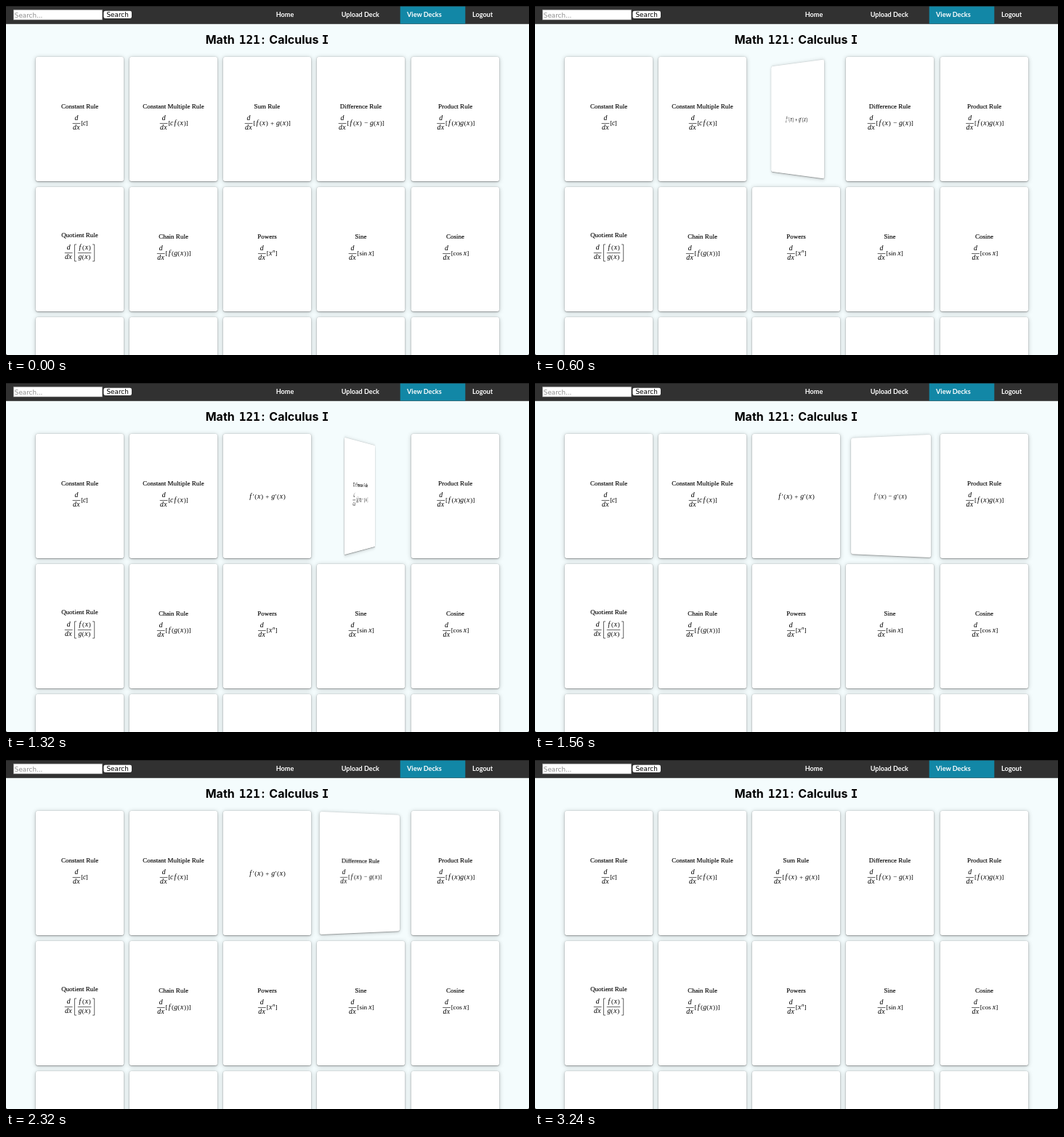
These frames come from a looping animation (720 px wide and 480 px high, 4.84 s). An HTML page:

```html
<!DOCTYPE html>
<html lang="en">
<head>
<meta charset="utf-8">
<title>Calculus flash cards</title>
<style>
html, body { margin: 0; width: 100%; height: 100%; overflow: hidden; background: #222; }
#stage { position: relative; width: 720px; height: 480px; overflow: hidden; background: #f4fcfd; border-radius: 0 0 2px 2px; }
#head { position: absolute; left: 0; top: 0; }
.card {
  position: absolute; width: 121px; height: 171px;
  background: #fff; border-radius: 2.5px;
  box-shadow: 0 .4px 1.4px rgba(0,0,0,.5), 0 1px 6px rgba(0,0,0,.24);
}
.card svg { position: absolute; left: 0; top: 0; overflow: visible; }
.card text { font: 9px "Liberation Serif", serif; fill: #000; text-anchor: middle; }
.card text.name { stroke: #000; stroke-width: .14; }
.card text.m { font-size: 9.2px; }
.card text.i { font-size: 9.8px; font-style: italic; }
.card text.sup { font-size: 7px; font-style: italic; }
.card path { fill: none; stroke: #222; stroke-width: .7; }
.nav { font: 700 9.1px Lato, "Open Sans", sans-serif; fill: #fff; }
.ui { font: 8.8px "DejaVu Sans", sans-serif; }
.title { font: 700 16px Inter, sans-serif; }
.slab { font: 700 16px "DejaVu Sans Mono", monospace; }
</style>
</head>
<body>
<div id="stage">
  <svg id="head" width="720" height="66">
    <rect width="720" height="24.8" fill="#313131"/>
    <rect width="720" height="1" fill="#222"/>
    <rect x="542.7" y=".6" width="89.6" height="23.9" fill="#1287a6"/>
    <rect x="10.3" y="5.2" width="122.4" height="13.8" fill="#fff" stroke="#888" stroke-width=".6"/>
    <rect x="134.5" y="6.7" width="38.5" height="10.4" rx="2.4" fill="#fff"/>
    <text class="ui" x="11.8" y="15.5" fill="#8d8d8d">Search...</text>
    <text class="ui" x="138.5" y="15.3">Search</text>
    <g class="nav">
      <text x="371.7" y="15.3">Home</text>
      <text x="461.7" y="15.3">Upload Deck</text>
      <text x="552" y="15.3">View Decks</text>
      <text x="642" y="15.3">Logout</text>
    </g>
    <g class="title">
      <text x="274.7" y="52">Math</text>
      <text class="slab" x="320.8" y="52">121</text>
      <text x="351.3" y="52">:</text>
      <text x="362.3" y="52">Calculus</text>
      <text class="slab" x="434.8" y="52">I</text>
    </g>
  </svg>
</div>
<script>
const EM = 9.1, W = 121, H = 171, DEPTH = 640, LOOP = 4840, STEP = 40;
const stage = document.getElementById('stage');

// Glyph advances in em
const ADV = {
  '[': .278, ']': .278, '(': .389, ')': .389, '+': 1.222, '−': 1.222, '′': .3, ' ': .167,
  f: .598, g: .513, x: .572, c: .433, d: .52, sin: 1.229, cos: 1.339, '^n': .45
};
const tokens = s => s.match(/sin|cos|\^n|./g);
const width = s => EM * tokens(s).reduce((sum, k) => sum + ADV[k], 0);
const label = (s, x, y, cls) => `<text class="${cls}" x="${x}" y="${y}">${s}</text>`;

function math(s, x, y) {
  return tokens(s).map(k => {
    const w = ADV[k] * EM, cx = x + w / 2;
    x += w;
    if (k === ' ') return '';
    if (k === '^n') return label('n', cx, y - 3.6, 'sup');
    return label(k, cx, y, /^[fgxcd]$/.test(k) ? 'i' : 'm');
  }).join('');
}

const centred = (s, cx, y) => math(s, cx - width(s) / 2, y);

function frac(num, den, cx, axis) {
  const w = Math.max(width(num), width(den)) / 2 + .4;
  return centred(num, cx, axis - 4.2) + centred(den, cx, axis + 8.6) +
    `<path d="M${cx - w} ${axis}H${cx + w}"/>`;
}

const PAD = .18 * EM, DX = width('dx') + 2 * PAD;

function derivative(name, body) {
  const x = W / 2 - (DX + width(body)) / 2;
  return label(name, W / 2, 70.8, 'name') + frac('d', 'dx', x + DX / 2, 91.5) + math(body, x + DX, 93.8);
}

function quotient() {
  const inner = width('f(x)') + 2 * PAD, b = .53 * EM;
  const x = W / 2 - (DX + inner + 2 * b) / 2, l = x + DX + 1.7, r = x + DX + 2 * b + inner - 1.7;
  return label('Quotient Rule', W / 2, 69.2, 'name') + frac('d', 'dx', x + DX / 2, 90.6) +
    frac('f(x)', 'g(x)', x + DX + b + inner / 2, 90.6) +
    `<path d="M${l + 2.6} 79H${l}V102H${l + 2.6}M${r - 2.6} 79H${r}V102H${r - 2.6}"/>`;
}

const faces = [
  derivative('Constant Rule', '[c]'),
  derivative('Constant Multiple Rule', '[cf(x)]'),
  derivative('Sum Rule', '[f(x)+g(x)]'),
  derivative('Difference Rule', '[f(x)−g(x)]'),
  derivative('Product Rule', '[f(x)g(x)]'),
  quotient(),
  derivative('Chain Rule', '[f(g(x))]'),
  derivative('Powers', '[x^n]'),
  derivative('Sine', '[sin x]'),
  derivative('Cosine', '[cos x]'),
  '', '', '', '', ''
];

const cards = faces.map((face, i) => {
  const el = document.createElement('div');
  el.className = 'card';
  el.style.left = 40.5 + 129.25 * (i % 5) + 'px';
  el.style.top = 69.5 + 179 * Math.floor(i / 5) + 'px';
  el.innerHTML = `<svg width="${W}" height="${H}"><g>${face}</g><g display="none"></g></svg>`;
  stage.append(el);
  return el;
});

function flipCard(i, back, turns) {
  const el = cards[i], [front, rear] = el.querySelectorAll('g');
  rear.innerHTML = centred(back, W / 2, 89.2);
  return { el, front, rear, turns };
}

// Each turn: start time, duration; the first opens, the second closes
const flips = [
  flipCard(2, 'f′(x)+g′(x)', [[238, 523], [2713, 525]]),
  flipCard(3, 'f′(x)−g′(x)', [[1112, 527], [1838, 566]])
];

function progress(t, [start, span]) {
  const u = Math.min(1, Math.max(0, (t - start) / span));
  return .5 * u + .5 * u * u * (3 - 2 * u);
}

function pose({ el, front, rear, turns: [open, close] }, t) {
  const p = progress(t, open) - progress(t, close);
  const flipped = p > .5;
  front.setAttribute('display', flipped ? 'none' : 'inline');
  rear.setAttribute('display', flipped ? 'inline' : 'none');
  if (p < 1e-4 || p > .9999) {
    el.style.transform = 'none';
    return;
  }
  // The card sinks back while it turns
  const sink = 104 * Math.sin(Math.PI * p) ** 1.2;
  const angle = 180 * (flipped ? p - 1 : p);
  el.style.transform = `perspective(${DEPTH}px) translateZ(${-sink}px) rotateY(${angle}deg)`;
}

function draw(ms) {
  const t = Math.floor((ms % LOOP) / STEP) * STEP;
  flips.forEach(f => pose(f, t));
}

const begin = performance.now();
function tick() {
  draw(performance.now() - begin);
  requestAnimationFrame(tick);
}
tick();
</script>
</body>
</html>
```
